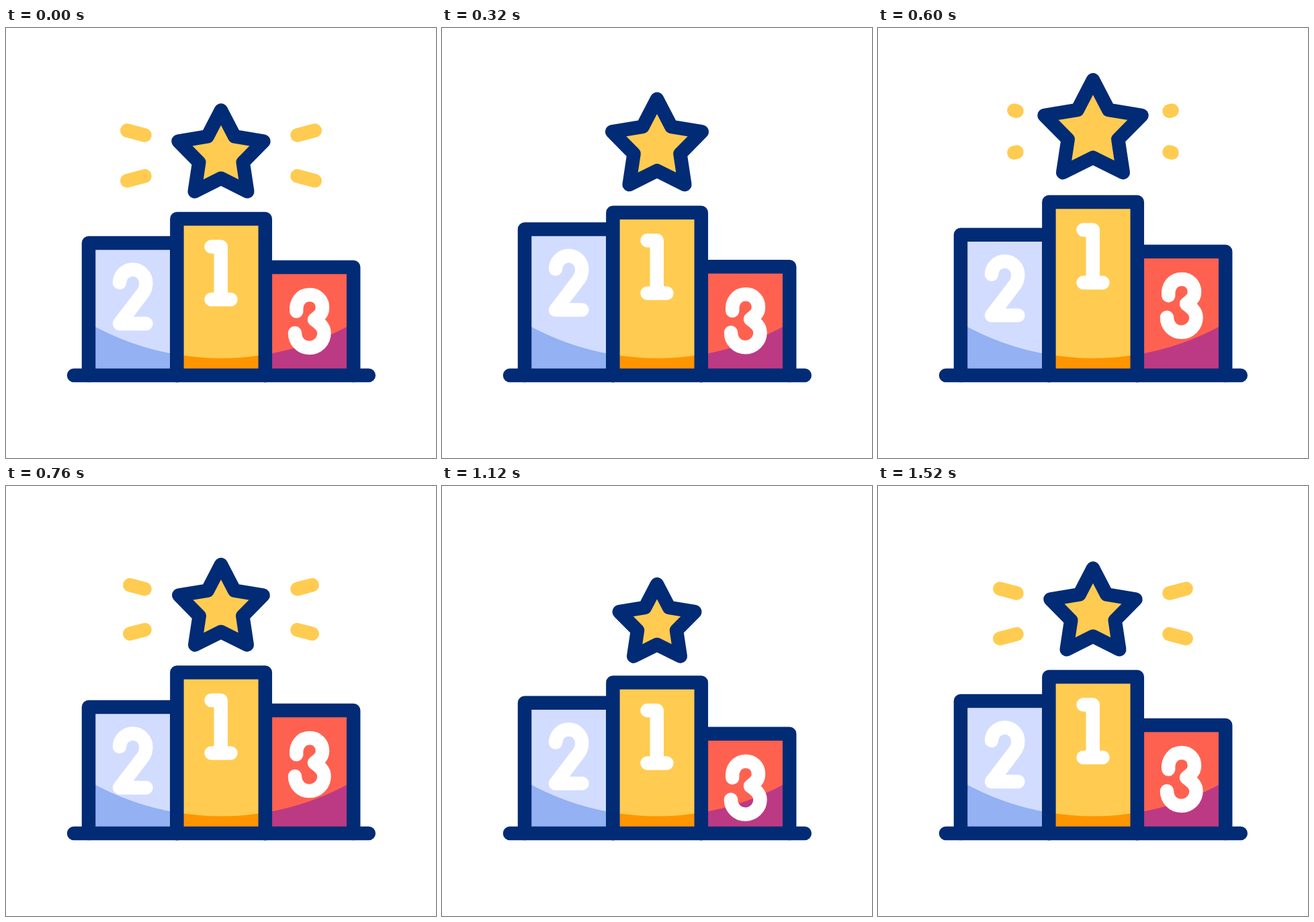
Recreate the animation shown at these times as an HTML page with a canvas. Size 640 by 640 pixels, loop 1560 ms.

```html
<!DOCTYPE html>
<html lang="en">
<head>
<meta charset="utf-8">
<title>Winners' podium</title>
<style>
  html, body { margin: 0; width: 100%; height: 100%; overflow: hidden; background: #fff; }
  canvas { display: block; }
</style>
</head>
<body>
<canvas width="640" height="640"></canvas>
<script>
const LOOP = 1560, STEP = 40, BASE = 517, LINE = 20.5;
const NAVY = '#022b75', YELLOW = '#ffcc51';
const ctx = document.querySelector('canvas').getContext('2d');

// The middle column comes last so that its outline covers its neighbours.
const columns = [
  { x: 123, top: 320, delay: 40, fill: '#d2dcfe', shade: '#93b1f3',
    digit: 'M169 379A19.6 20 0 0 1 208.3 380C208.3 387 205.5 393 201 398L169 440H208.5' },
  { x: 385.8, top: 356, delay: 280, fill: '#ff6150', shade: '#bc3a83',
    digit: 'M432.3 421.5C431 408 439 397 452 397C463 397 471 405 471 416C471 424 468 427 459 434' +
           'C467 440 473.5 445 473.5 454C473.5 466 464 476 451.5 476C439 476 430 466 430 454' },
  { x: 254.4, top: 284, delay: 160, fill: YELLOW, shade: '#ff9500',
    digit: 'M305.5 325.5H319.8V404M305.5 404H334.5' }
];
const COLUMN_WIDTH = 131.4;

function ease(t, start, duration) {
  const p = Math.min(1, Math.max(0, (t - start) / duration));
  return p * p * (3 - 2 * p);
}

// Rest, up, down and back to rest, 400 ms each.
function bounce(t, start, up, down) {
  return up * ease(t, start, 400) + (down - up) * ease(t, start + 400, 400) - down * ease(t, start + 800, 400);
}

function stroke(path, color) {
  ctx.strokeStyle = color;
  ctx.stroke(new Path2D(path));
}

function fill(path, color) {
  ctx.fillStyle = color;
  ctx.fill(new Path2D(path));
}

function drawColumn(t, { x, top, delay, fill: color, shade, digit }) {
  const dy = bounce(t, delay, -26, 13);
  const right = x + COLUMN_WIDTH, radius = 397.5;
  const arcY = px => 94 + Math.sqrt(radius ** 2 - (px - 320) ** 2);
  const box = `M${x} ${BASE}V${top + dy}H${right}V${BASE}`;
  fill(box, color);
  fill(`M${x} ${arcY(x)}A${radius} ${radius} 0 0 0 ${right} ${arcY(right)}V${BASE}H${x}Z`, shade);
  stroke(box, NAVY);
  ctx.save();
  ctx.translate(0, dy);
  stroke(digit, '#fff');
  ctx.restore();
}

function drawStar(t, cy) {
  const scale = 1 + bounce(t, 160, 0.15, -0.175);
  const points = Array.from({ length: 10 }, (_, i) => {
    const r = scale * (i % 2 ? 34.4 : 66.8), a = i * Math.PI / 5;
    return `${320 + r * Math.sin(a)} ${cy - r * Math.cos(a)}`;
  });
  const star = `M${points.join('L')}Z`;
  fill(star, YELLOW);
  stroke(star, NAVY);
}

// Each ray grows outwards, then its inner end catches up.
function drawRays(t, dy) {
  const inTime = [t < 520 ? 1 : t < 1240 ? ease(t, 520, 320) : ease(t, 1240, 320)][0];
  const outTime = t < 520 ? ease(t, 0, 320) : t < 1240 ? ease(t, 780, 320) : 0;
  if (inTime <= outTime) return;
  for (const side of [-1, 1]) {
    for (const [y, slope] of [[159.5, -7], [220.3, 7]]) {
      const at = p => `${320 + side * (113.5 + 26.3 * p)} ${y + dy + slope * p}`;
      stroke(`M${at(outTime)}L${at(inTime)}`, YELLOW);
    }
  }
}

function draw() {
  const t = Math.floor(performance.now() % LOOP / STEP) * STEP;
  ctx.fillStyle = '#fff';
  ctx.fillRect(0, 0, 640, 640);
  ctx.lineWidth = LINE;
  ctx.lineCap = ctx.lineJoin = 'round';
  for (const column of columns) drawColumn(t, column);
  stroke(`M101 ${BASE}H539.8`, NAVY);
  const lift = bounce(t, 160, -37.5, 25);
  drawRays(t, lift);
  drawStar(t, 189.3 + lift);
  requestAnimationFrame(draw);
}
draw();
</script>
</body>
</html>
```
